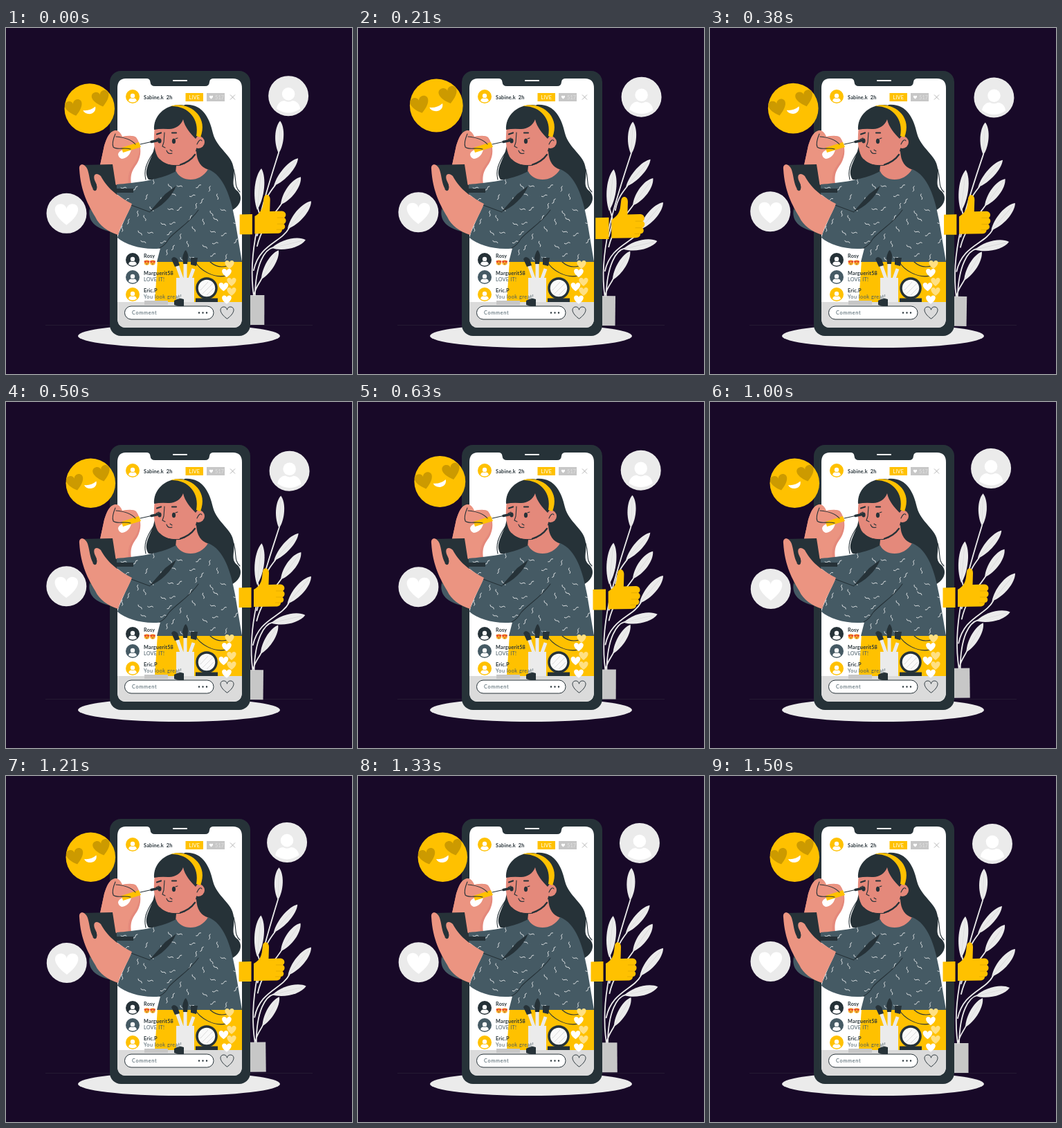
Write an HTML page that moves like this. It is 500 by 500 pixels and loops after 1540 ms.

```html
<!DOCTYPE html>
<html lang="en">
<head>
<meta charset="utf-8">
<title>Live make-up stream</title>
<style>
  html, body { margin: 0; width: 100%; height: 100%; overflow: hidden; background: #180928; }
  svg { display: block; width: 100%; height: 100%; }
  text { font: 7.3px Lato, sans-serif; fill: #455a64; letter-spacing: .2px; }
  .bold { font-weight: 700; fill: #263238; }
  .dark { fill: #263238; }
  .cloth { fill: #455a64; }
  .gold { fill: #ffc100; }
  .pale { fill: #ebebeb; }
  .grey { fill: #c7c7c7; }
  .white { fill: #fff; }
  .skin { fill: #eb9481; }
  .face { fill: #e4897b; }
  .line { fill: none; stroke: #263238; stroke-width: 1.1; stroke-linecap: round; stroke-linejoin: round; }
  .thick { stroke-width: 2.2; }
  .stem { fill: none; stroke: #ebebeb; stroke-width: 1.8; stroke-linecap: round; }
</style>
</head>
<body>
<svg viewBox="0 0 500 500">
  <defs>
    <path id="heart" d="M0,.92C-1.4,-.1 -1.1,-.9 -.5,-.9C-.2,-.9 0,-.65 0,-.45C0,-.65 .2,-.9 .5,-.9C1.1,-.9 1.4,-.1 0,.92Z"/>
    <g id="person" class="white">
      <circle cy="-.1" r=".32"/>
      <path d="M-.59,.64C-.55,.33 -.32,.24 -.2,.24Q0,.36 .2,.24C.32,.24 .55,.33 .59,.64Q0,1.04 -.59,.64Z"/>
    </g>
    <path id="top" d="M160,226C185,224 222,220 246,207C252,222 280,225 292,204C315,213 325,245 331,278L341,338H218L223,318.500C198,321 174,314 161,303C165,289 175,270 181,256L160,240Z"/>
    <clipPath id="topClip"><use href="#top"/></clipPath>
  </defs>

  <path d="M57,429.5H443" stroke="#241a32"/>
  <ellipse class="pale" cx="250" cy="445" rx="146" ry="17"/>

  <g id="wind">
    <path class="grey" d="M346,386H373.5V429H346Z"/>
    <path class="stem" d="M358,386C348,320 372,250 394,180M360,386C361,340 374,320 386,317M359,384C361,374 367,368 370,361M358,350C366,312 398,310 409,289M363,315C370,285 386,272 398,254M363,300C372,270 366,272 364,260M372,262C375,245 382,236 389,227"/>
    <g id="leaves" class="pale"></g>
    <circle class="pale" cx="408" cy="98" r="29"/>
    <use href="#person" transform="translate(408 98) scale(29)"/>
    <circle class="pale" cx="87.5" cy="268" r="29"/>
    <use href="#heart" class="white" transform="translate(87.5 269.5) scale(16.7)"/>
  </g>

  <!-- phone -->
  <rect class="dark" x="150" y="62" width="203" height="383" rx="16"/>
  <path class="white" d="M173,73H203Q208,73 208.500,78Q209,84 215,84H288Q293.500,84 294,78Q294.500,73 300,73H328Q341,73 341,87V419Q341,433 328,433H174Q161,433 161,419V87Q161,73 173,73Z"/>
  <path d="M242,76H261" stroke="#fff" stroke-width="2.2" stroke-linecap="round"/>
  <text class="bold" x="199" y="102.500">Sabine.k&#160; 2h</text>
  <rect class="gold" x="259.500" y="94" width="25.500" height="12"/>
  <text x="272.300" y="102.700" text-anchor="middle" style="fill:#fff">LIVE</text>
  <rect class="grey" x="290" y="94" width="26" height="12"/>
  <use href="#heart" class="white" transform="translate(296.500 100) scale(2.6)"/>
  <text x="302" y="102.700" style="fill:#e2e2e2">517</text>
  <path d="M324,96.500L331,103.500M331,96.500L324,103.500" stroke="#b5b5b5"/>

  <!-- hair behind -->
  <path class="dark" d="M258,111C284,109 294,130 299,152C305,175 327,183 329,203C331,219 324,228 335,236C344,246 337,260 323,265C326,252 310,240 296,236L230,221L206,219C198,207 207,196 213,178L220,150Z"/>
  <path class="line" d="M213,180C202,196 199,207 202,219M329,204C334,222 329,228 338,237"/>

  <!-- far hand, wand and sleeve -->
  <path class="dark" d="M121,258C117,280 132,293 163,297L166,260Z"/>
  <path class="cloth" d="M121,262C117,281 132,292 162,296L150,277Z"/>
  <path class="face" d="M158,148C149,150 146,158 142,170L136,198C139,211 148,222 160,227L181,225C178,205 189,200 192,190C196,180 195,168 188,158Q183,154 168,157Q164,148 158,148Z"/>
  <path class="skin" d="M158,148C149,150 146,158 142,170L136,198C139,211 148,222 160,227L177,225C174,204 187,198 190,187C195,176 193,166 187,158Q181,155 168,157Q164,148 158,148Z"/>
  <path class="white" d="M162,182C164,176 172,174 181,176C179,184 173,189 167,189Q162,187 162,182Z"/>
  <path class="gold" d="M167,173L192,165L195,172L169,180Z"/>
  <path class="line" d="M158,153C155,160 153,167 155,172C160,177 171,172 180,175M159,157C170,158 181,161 187,168"/>
  <path class="line" d="M194,168L212,164"/>

  <!-- head -->
  <path class="face" d="M247,188L245,210C252,226 280,229 293,205Q276,200 275,178Z"/>
  <circle class="face" cx="278" cy="165" r="9"/>
  <path class="face" d="M215,142C213,160 213,174 219,186C227,197 241,201 255,197C267,193 275,182 276,168L273,130L245,122Z"/>
  <path class="line" d="M222,190C230,199 247,201 258,196M276,168Q280,159 283,163"/>
  <path class="line thick" d="M252,197.500Q266,193 273,183"/>
  <path class="dark" d="M214,147C213,128 228,111 252,111C274,112 282,132 280,152L274,160C267,153 258,143 256,132C253,141 243,147 234,146Q224,145 214,147Z"/>
  <path class="gold" d="M238,113C262,105 294,126 281,158L275,156C280,131 263,112 238,113Z"/>
  <path class="line thick" d="M218,153.500L224,151.500M240,151.500L246,151.500"/>
  <path class="line" d="M229,151L228,165L226,171L230,173M232,177Q234,183 240,181M237,176L240,178M217,161L221,159M245,160L248,159"/>
  <ellipse class="dark" cx="222" cy="163" rx="2.600" ry="3.600"/>
  <ellipse class="dark" cx="242.500" cy="163.500" rx="2.600" ry="3.800"/>
  <path d="M210,164.500L222,162" stroke="#263238" stroke-width="3.500" stroke-linecap="round"/>

  <!-- body -->
  <path class="gold" d="M219,336H341V396H215Z"/>
  <path class="line" d="M273,337C280,350 300,362 318,358M295,338C304,346 312,346 319,344"/>
  <use href="#top" class="cloth"/>
  <path id="squiggles" fill="none" stroke="#fff" stroke-width=".8" stroke-linecap="round" clip-path="url(#topClip)"/>
  <path class="dark" d="M207,266C224,259 239,245 246,228L230,240ZM160,232L178,232H184V238H160Z"/>
  <path class="line" d="M181,256L208,266M278,263C265,282 246,292 235,305Q230,314 222,318"/>

  <!-- near hand with mirror -->
  <path class="dark" d="M112,198L154,197L160,236L122,238Z"/>
  <path class="skin" d="M106,204C105,195 114,195 118,205C121,214 121,225 126,233C130,238 134,231 129,222C124,211 131,208 137,214C146,230 156,240 182,254C176,270 166,284 162,299C147,294 135,286 129,273C119,256 108,237 106,204Z"/>
  <path class="line" d="M126,233C129,237 132,234 130,226"/>

  <!-- bottom bar and beauty tools -->
  <path d="M161,396H341V419Q341,433 328,433H174Q161,433 161,419Z" fill="#dbdbdb"/>
  <path class="grey" d="M200,394H234V400H200Z"/>
  <path d="M247,342L254,362M259,338V362M271,348L266,362" stroke="#ebebeb" stroke-width="5"/>
  <path class="dark" d="M239,334Q242,328 248,334L251,343L244,345ZM255,332Q257,322 260,321Q264,327 263,332L262,341H256ZM267,332H277L275,344L267,342Z"/>
  <path class="pale" d="M246,361H272V396H246Z"/>
  <path class="dark" d="M274,390.500H306V396H274Z"/>
  <circle cx="290" cy="376" r="14" fill="#fafafa" stroke="#263238" stroke-width="3.500"/>
  <path d="M281,379L292,367M284,384L299,369M290,386L300,376" stroke="#dbdbdb"/>
  <path class="dark" d="M243,394Q250,389 257,392V402Q249,403 243,400Z"/>
  <rect x="171.500" y="402" width="128.500" height="19" rx="9.500" fill="#fff" stroke="#263238"/>
  <text x="182" y="414.300" style="letter-spacing:.7px">Comment</text>
  <path d="M279,411.500h0M284.500,411.500h0M290,411.500h0" stroke="#263238" stroke-width="2.400" stroke-linecap="round"/>
  <use href="#heart" transform="translate(319.500 411.500) scale(9.5)" fill="none" stroke="#263238" stroke-width=".1"/>

  <!-- chat -->
  <g id="chat"></g>
  <text class="bold" x="199" y="332">Rosy</text>
  <text class="bold" x="199" y="357">Marguerit58</text>
  <text x="199" y="366.300">LOVE IT!</text>
  <text class="bold" x="199" y="382">Eric.P</text>
  <text x="199" y="391" style="letter-spacing:.5px">You look great!</text>

  <g id="beat">
    <circle class="gold" cx="122.300" cy="117.300" r="35.800"/>
    <g fill="#cc9a00">
      <use href="#heart" transform="translate(100.300 116.500) rotate(-14) scale(12.300)"/>
      <use href="#heart" transform="translate(138.700 103.500) rotate(-14) scale(12.300)"/>
    </g>
    <path class="white" d="M113,120Q123,121 130.500,114.500C132,121 127,125 122,125Q115,125 113,120Z"/>
    <path class="gold" d="M336.500,268.500L354.500,268V297H336.500Z"/>
    <path class="gold" d="M358,271C365,267 369,262 370,253L371,245C372,238 380,239 380,247L379.500,264L397,263.500C403,264 404,271 400,273C404,275 403,281 399.500,282C403,285 401,290 397,290C397,294 394,295.500 390,295.500L358,296Z"/>
    <path d="M390,273H399M390,282H399M389,290H396" stroke="#dba500" stroke-width=".7"/>
  </g>
</svg>

<script>
const $ = id => document.getElementById(id);

// Leaves: base x, y, tip x, y, half width
$('leaves').innerHTML = [
  [394, 181, 396, 134, 8], [387, 228, 422, 188, 8], [397, 255, 426, 215, 9],
  [407, 290, 441, 250, 9], [384, 318, 433, 306, 9], [369, 363, 394, 321, 8],
  [363, 263, 369, 203, 9]
].map(([x, y, tx, ty, w]) => {
  const length = Math.hypot(tx - x, ty - y);
  const angle = Math.atan2(ty - y, tx - x) * 180 / Math.PI;
  return `<g transform="translate(${x} ${y}) rotate(${angle}) scale(${length} ${w})">
    <path d="M0,0C.3,-1 .8,-1 1,0C.8,1 .3,1 0,0Z"/>
    <path d="M.05,0H.9" stroke="#d6d6d6" stroke-width=".07"/></g>`;
}).join('');

// Squiggle print on a jittered grid
let print = '';
for (let row = 0; row < 7; row++) {
  for (let col = 0; col < 9; col++) {
    const n = row * 9 + col, a = n * 2.4;
    const c = Math.cos(a) * 2, s = Math.sin(a) * 2;
    const x = 166 + col * 22 + (row % 2) * 11 + Math.sin(n * 7) * 3;
    const y = 228 + row * 17 + Math.cos(n * 5) * 3;
    print += `M${x},${y}q${c - s},${s + c} ${2 * c},${2 * s}t${2 * c},${2 * s}`;
  }
}
$('squiggles').setAttribute('d', print);

const heart = (x, y, size, fill) =>
  `<use href="#heart" fill="${fill}" transform="translate(${x} ${y}) scale(${size})"/>`;
const avatar = (y, fill) =>
  `<circle cx="183" cy="${y}" r="10" fill="${fill}"/>
   <use href="#person" transform="translate(183 ${y}) scale(10)"/>`;
const smiley = x =>
  `<circle cx="${x}" cy="339" r="3.8" fill="#ffb52e"/>` +
  heart(x - 2, 338, 1.9, '#e5482f') + heart(x + 2, 338, 1.9, '#e5482f') +
  `<path d="M${x - 1.5},340.500h3l-1.500,1.500z" fill="#8a4b16"/>`;

$('chat').innerHTML =
  avatar(99, '#ffc100') + avatar(335, '#263238') + avatar(360, '#455a64') + avatar(385, '#ffc100') +
  smiley(203.5) + smiley(212) +
  [[323, 342], [326, 367], [326, 381]].map(([x, y]) => heart(x, y, 6.6, '#ffe083')).join('') +
  [[319, 354], [314.5, 374], [319, 392.5]].map(([x, y]) => heart(x, y, 6.8, '#fff')).join('');

// Linear interpolation through [time, value] keys
function track(keys, t) {
  const i = Math.max(1, keys.findIndex(k => k[0] >= t));
  const [t0, v0] = keys[i - 1], [t1, v1] = keys[i];
  return v0 + (v1 - v0) * (t - t0) / (t1 - t0);
}

const LOOP = 1540, LEAD = 18, CYCLE = 1500;
const sway = [[0, 0], [375, 1], [1125, -1], [CYCLE, 0]];
const pulse = [[0, 1], [150, 1.1], [450, 1], [600, 1], [750, 1.1], [900, 1], [CYCLE, 1]];

function draw(now) {
  const t = Math.min(now % LOOP + LEAD, CYCLE);
  $('wind').setAttribute('transform', `rotate(${track(sway, t)} 250 249)`);
  $('beat').setAttribute('transform',
    `translate(245 190) scale(${track(pulse, t)}) translate(-245 -190)`);
}

const start = performance.now();
function frame() {
  draw(performance.now() - start);
  requestAnimationFrame(frame);
}
frame();
</script>
</body>
</html>
```
